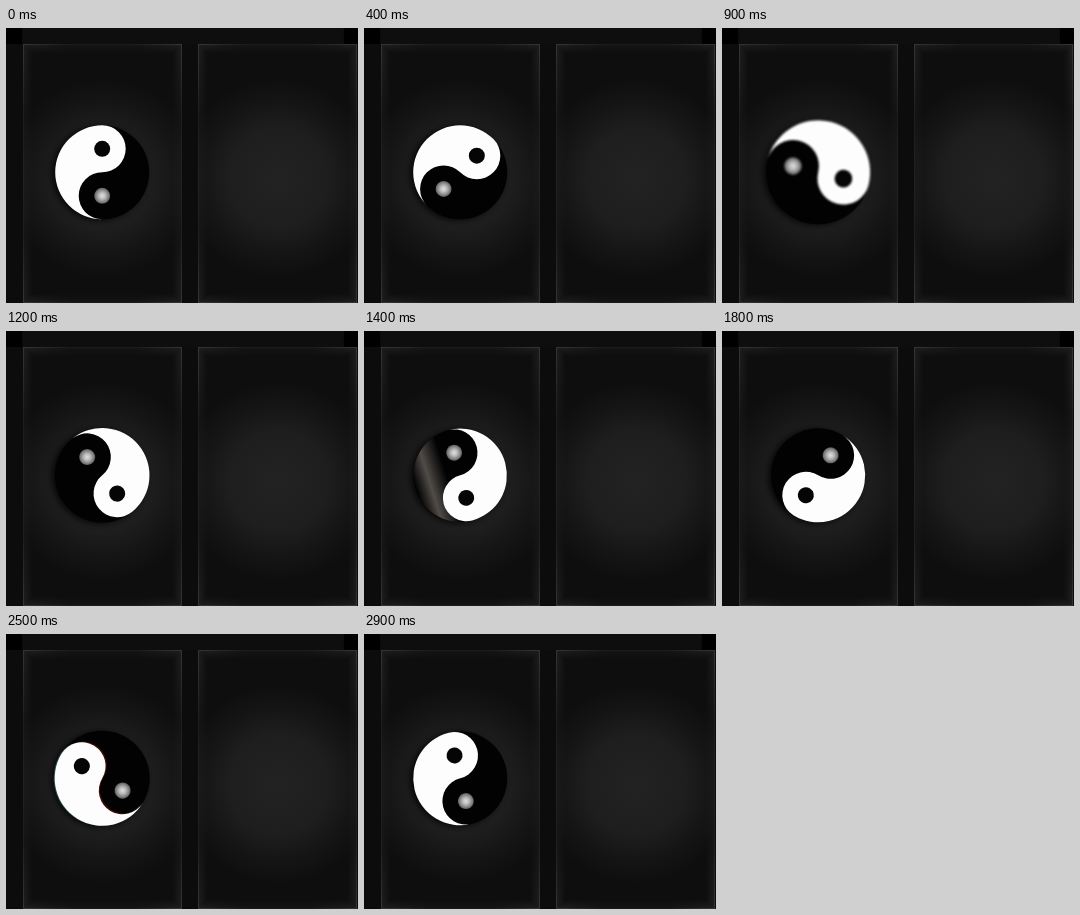
An HTML page with a canvas for the animation above (3 s loop, 352x275 px).

```html
<!DOCTYPE html>
<html lang="en">
<head>
<meta charset="utf-8">
<title>Yin and yang</title>
<style>
html, body { margin: 0; width: 100%; height: 100%; overflow: hidden; background: #0c0c0c; }
canvas { display: block; }
</style>
</head>
<body>
<canvas id="stage" width="352" height="275"></canvas>
<script>
const ctx = document.getElementById('stage').getContext('2d');
const LOOP = 3000, STEP = 100, TAU = Math.PI * 2;

// [time, value] keys, joined linearly
const ANGLE = [[0, 0], [400, 45], [900, 104], [1400, 165], [2100, 247], [2500, 301], [2900, 346], [3000, 360]];
const RADIUS = [[0, 47], [500, 47], [600, 49], [1000, 53], [1200, 47.3], [1400, 46.7], [1800, 47],
                [2200, 54], [2400, 50], [2500, 47.5], [2900, 47], [3000, 47]];
const GLINT = [[0, 0], [1200, 0], [1400, 1], [1600, 0], [3000, 0]];
const FRINGE = [[0, 0], [1800, 0], [2000, 1], [2500, 1], [2700, 0], [3000, 0]];

function valueAt(keys, t) {
  const i = keys.findIndex(k => k[0] > t);
  const [t0, a] = keys[i - 1], [t1, b] = keys[i];
  return a + (b - a) * (t - t0) / (t1 - t0);
}

function gradient(g, ...stops) {
  stops.forEach(([at, color]) => g.addColorStop(at, color));
  return g;
}

function rect(color, x, y, w, h) {
  ctx.fillStyle = color;
  ctx.fillRect(x, y, w, h);
}

function disc(color, x, y, r) {
  ctx.fillStyle = color;
  ctx.beginPath();
  ctx.arc(x, y, r, 0, TAU);
  ctx.fill();
}

function card(x) {
  const y = 16, w = 159, h = 259;
  rect('#0e0e0e', x, y, w, h);
  const glow = gradient(ctx.createRadialGradient(x + 80, 150, 0, x + 80, 150, 100),
    [0, '#222'], [0.5, '#1e1e1e'], [0.75, '#151515'], [1, '#0e0e0e']);
  rect(glow, x, y, w, h);
  // edge light, strongest in the corners
  for (let i = 0; i < 9; i++) {
    const a = i ? 0.07 * (1 - i / 9) : 0.16;
    const edge = (x0, y0, x1, y1) => gradient(ctx.createLinearGradient(x0, y0, x1, y1),
      [0, `rgba(255,255,255,${a})`], [0.3, `rgba(255,255,255,${a * 0.35})`],
      [0.7, `rgba(255,255,255,${a * 0.35})`], [1, `rgba(255,255,255,${a})`]);
    const across = edge(x, 0, x + w, 0), down = edge(0, y, 0, y + h);
    rect(across, x + i, y + i, w - 2 * i, 1);
    rect(across, x + i, y + h - 1 - i, w - 2 * i, 1);
    rect(down, x + i, y + i + 1, 1, h - 2 * i - 2);
    rect(down, x + w - 1 - i, y + i + 1, 1, h - 2 * i - 2);
  }
}

function background() {
  rect('#0c0c0c', 0, 0, 352, 275);
  rect('#0e0e0e', 17, 0, 320, 16);
  rect('#000', 0, 0, 16, 16);
  rect('#000', 338, 0, 14, 16);
  card(17);
  card(192);
}

function whiteHalf(r) {
  const p = new Path2D(), q = Math.PI / 2;
  p.arc(0, 0, r, q, 3 * q);
  p.arc(0, -r / 2, r / 2, -q, q);
  p.arc(0, r / 2, r / 2, -q, q, true);
  return p;
}

function symbol(t) {
  const r = valueAt(RADIUS, t), angle = valueAt(ANGLE, t) * Math.PI / 180;
  const glint = valueAt(GLINT, t), fringe = valueAt(FRINGE, t);
  const white = whiteHalf(r), s = r / 47;
  const fillHalf = (color, dx, dy) => {
    ctx.save();
    ctx.translate(dx, dy);
    ctx.rotate(angle);
    ctx.fillStyle = color;
    ctx.fill(white);
    ctx.restore();
  };

  ctx.save();
  ctx.translate(96.2, 144.3);
  ctx.filter = 'blur(3px)';
  disc('rgba(0,0,0,.8)', -3, 1, r);
  ctx.filter = 'blur(0.5px)';
  disc('#020202', 0, 0, r);
  if (glint) {
    disc(gradient(ctx.createLinearGradient(-46, 8, -14, -2),
      [0, 'rgba(80,76,72,0)'], [0.45, `rgba(80,76,72,${glint})`], [1, 'rgba(80,76,72,0)']), 0, 0, r);
  }
  if (fringe) {
    fillHalf(`rgba(110,20,10,${fringe * 0.6})`, 1.3, -0.8);
    fillHalf(`rgba(60,120,125,${fringe * 0.6})`, -1, 0);
  }
  ctx.filter = `blur(${0.5 + (r - 46.7) * 0.06}px)`;
  fillHalf('#fdfdfd', 0, 0);

  ctx.rotate(angle);
  disc('#050505', 0, -r / 2, 8 * s);
  disc(gradient(ctx.createRadialGradient(0, r / 2, 0, 0, r / 2, 8 * s),
    [0, '#e0e0e0'], [0.4, '#bbb'], [0.85, '#777'], [1, '#555']), 0, r / 2, 8 * s);
  ctx.restore();
}

function draw(now) {
  const t = Math.floor(now % LOOP / STEP) * STEP;
  background();
  symbol(t);
}

const start = performance.now();
function tick() {
  draw(performance.now() - start);
  requestAnimationFrame(tick);
}
tick();
</script>
</body>
</html>
```
